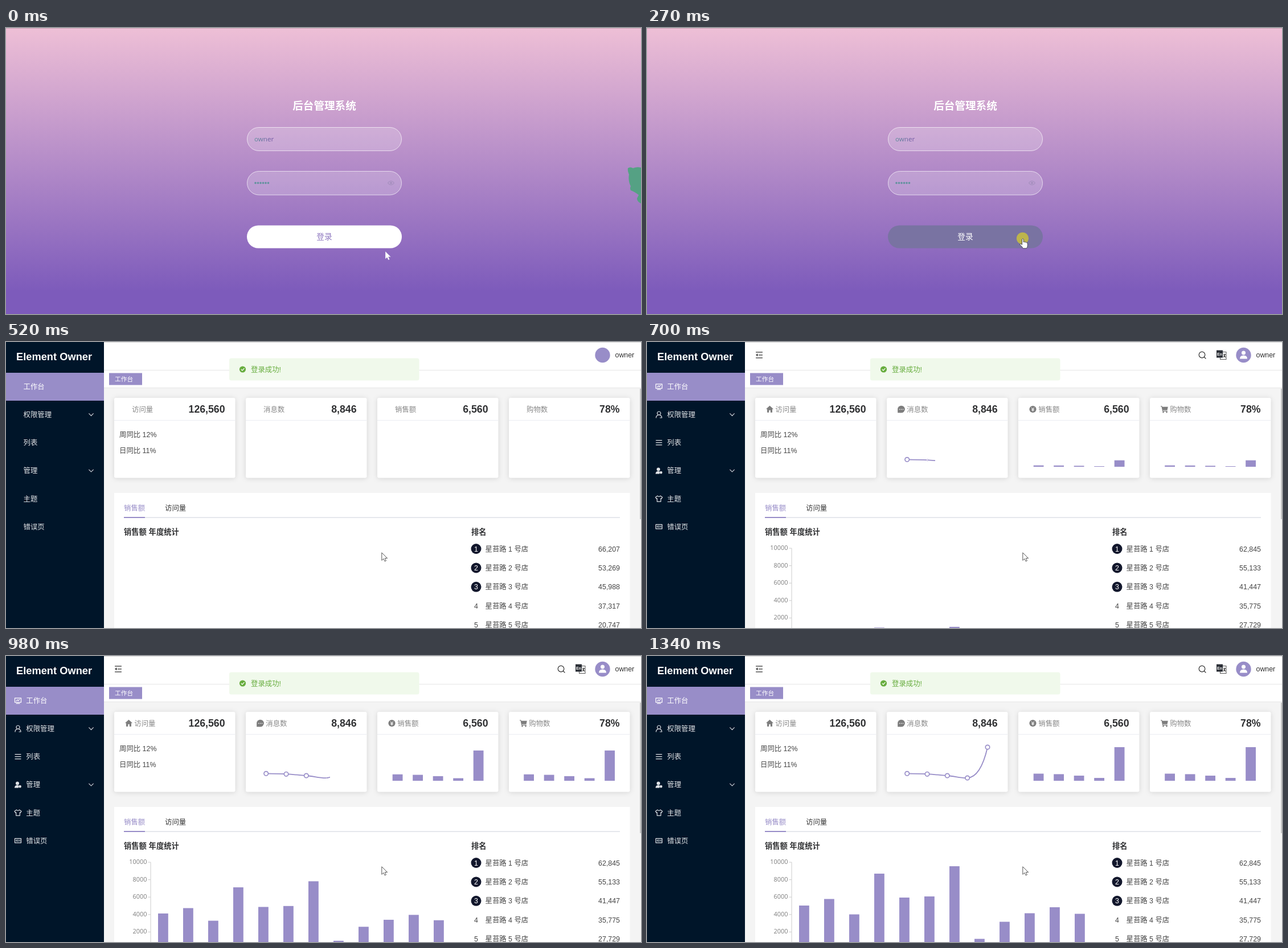
Recreate the animation shown at these times as an HTML page. Size 1115 by 502 pixels, loop 1530 ms.

```html
<!DOCTYPE html>
<html lang="zh-CN">
<head>
<meta charset="utf-8">
<title>Dashboard login</title>
<style>
  html, body { margin: 0; width: 100%; height: 100%; overflow: hidden; background: #fff; }
  svg { display: block; width: 1115px; height: 502px; }
  text { font: 12.4px "Liberation Sans", "Noto Sans CJK SC", "Noto Sans CJK", sans-serif; white-space: pre; }
  .bold { font-weight: 700; }
  .line { fill: none; stroke: currentColor; stroke-width: 1.2; stroke-linecap: round; stroke-linejoin: round; }
  .card { fill: #fff; filter: drop-shadow(0 1px 4px rgba(0, 0, 0, .13)); }
  .field { fill: rgba(255, 255, 255, .2); stroke: rgba(255, 255, 255, .65); }
  .axis { font: 10.9px "Open Sans", "Noto Sans", sans-serif; fill: #7d7d7d; text-anchor: end; }
  .theme { fill: #988dc8; }
</style>
</head>
<body>
<svg viewBox="0 0 1115 502">
  <defs>
    <linearGradient id="sky" x1="0" y1="0" x2="0" y2="1">
      <stop offset="0" stop-color="#eebfd6"/>
      <stop offset=".92" stop-color="#7d5bbb"/>
    </linearGradient>
    <linearGradient id="ink">
      <stop offset="0" stop-color="#5b8f98"/>
      <stop offset="1" stop-color="#7352a4"/>
    </linearGradient>
    <clipPath id="reveal"><rect id="revealBox" x="439" y="140" width="0" height="95"/></clipPath>
    <path id="chevron" class="line" d="M-3.8 -1.8 0 2 3.8 -1.8"/>
  </defs>

  <g id="login">
    <rect width="1115" height="502" fill="url(#sky)"/>
    <rect width="1115" height="1" fill="#c9a3b6"/>
    <text class="bold" x="559" y="143" text-anchor="middle" fill="#fff" style="font-size:18.6px">后台管理系统</text>
    <rect class="field" x="423.5" y="174.5" width="271" height="41" rx="20.5"/>
    <text x="436" y="199" fill="url(#ink)" style="font:11.6px 'Open Sans','Noto Sans',sans-serif">owner</text>
    <rect class="field" x="423.5" y="251.5" width="271" height="41.5" rx="20.7"/>
    <g id="dots" fill="#5f929c"></g>
    <g color="#a68fbf">
      <path class="line" d="M670.5 272q5.5 -7 11 0q-5.5 7 -11 0z"/>
      <circle cx="676" cy="272" r="2" fill="currentColor"/>
    </g>
    <rect id="button" x="423" y="346.5" width="272" height="40" rx="20"/>
    <text id="buttonText" x="559" y="371" text-anchor="middle" style="font-size:13.7px">登录</text>
    <path id="mascot" fill="#55a184" d="M1092 246Q1096 243 1101 246Q1108 243 1115 245V308Q1108 305 1108 299L1111 293Q1103 287 1097 285Q1095 281 1097 278Q1092 268 1094 257Q1091 251 1092 246Z"/>
  </g>

  <g id="board">
    <rect width="1115" height="502" fill="#f4f4f4"/>
    <rect x="172" width="943" height="81" fill="#fff"/>
    <path d="M172 49.5H1115M172 80.5H1115" stroke="#e6e6e6"/>
    <rect x="172" width="943" height="1" fill="#d9d9d9"/>
    <rect width="172" height="502" fill="#001529"/>
    <text class="bold" x="18" y="31.5" fill="#fff" style="font-size:18.3px">Element Owner</text>
    <rect class="theme" y="54" width="172" height="49"/>
    <g id="menu"></g>
    <rect class="theme" x="181" y="54.5" width="58" height="21"/>
    <text x="191" y="69" fill="#fff" style="font-size:10.7px">工作台</text>
    <circle class="theme" cx="1047.5" cy="23" r="13.2"/>
    <text x="1069.5" y="27" fill="#333">owner</text>
    <rect x="1113" y="82" width="2" height="229" fill="#c8c8c8"/>
    <g id="cards"></g>
    <text x="199" y="167" fill="#444">周同比 12%</text>
    <text x="199" y="195" fill="#444">日同比 11%</text>

    <rect x="190" y="265" width="905.5" height="237" fill="#fff"/>
    <text class="theme" x="207" y="296">销售额</text>
    <text x="279" y="296" fill="#333">访问量</text>
    <rect x="207" y="307.3" width="871" height="1.7" fill="#e2e4ea"/>
    <rect class="theme" x="207" y="307" width="37" height="2"/>
    <text class="bold" x="207" y="337.5" fill="#303133" style="font-size:13.3px">销售额 年度统计</text>
    <text class="bold" x="817" y="337.5" fill="#303133" style="font-size:13.3px">排名</text>
    <g id="ranks"></g>

    <g id="icons">
      <g color="#333">
        <path class="line" d="M191.5 17.8H202.5M196.5 22.8H202.5M191.5 27.8H202.5"/>
        <path d="M194.5 20.3V25.3L191 22.8Z" fill="currentColor"/>
        <circle class="line" cx="974.5" cy="22.5" r="5.3"/>
        <path class="line" d="M978.5 26.5 981 29"/>
        <rect x="1006.5" y="17.5" width="10.5" height="13" fill="#fff" stroke="#555"/>
        <rect x="1000" y="14.5" width="11" height="13" fill="#2b2f36"/>
        <text x="1001" y="23.5" fill="#fff" class="bold" style="font-size:7px">En</text>
        <path class="line" d="M1012.5 21.5H1015.5L1012.5 26.5M1013 23.5 1015.5 26.5"/>
      </g>
      <g fill="#fff">
        <circle cx="1047.5" cy="19" r="3.5"/>
        <path d="M1041 29.5Q1041 23.5 1047.5 23.5T1054 29.5Z"/>
      </g>
      <g id="menuIcons"></g>
      <g id="cardIcons"></g>
    </g>

    <g id="charts">
      <g id="axis"></g>
      <g id="bars" class="theme"></g>
      <path clip-path="url(#reveal)" fill="none" stroke="#988dc8" stroke-width="1.8"
        d="M456.7 206.3C469 206.4 480 206.5 492 207.2S515 209 527.3 210S553 214.5 562.6 214C582 213 592 186 598 160"/>
      <g id="marks" fill="#fff" stroke="#988dc8" stroke-width="1.7"></g>
    </g>
  </g>

  <g id="message">
    <rect x="392" width="333.5" height="39" rx="3.5" fill="#f0f9eb"/>
    <circle cx="415.5" cy="19.5" r="5.6" fill="currentColor"/>
    <path class="line" d="M413 19.6 414.9 21.5 418.2 17.9" style="stroke:#fff"/>
    <text x="430" y="24.3" fill="currentColor">登录成功!</text>
  </g>

  <circle id="click" cx="659.5" cy="369.3" r="10.6" fill="#bdb44c"/>
  <path id="arrow" fill="#fff" d="M0 0V13.5L3.2 10.7 5.3 15.2 7.6 14.2 5.5 9.8H9.8Z"/>
  <path id="hand" fill="#fff" stroke="#3c3c48" stroke-width=".9" stroke-linejoin="round"
    d="M-1.3 1Q0 -1 1.3 1V6Q3 4.5 4 6.3Q5.7 5 6.5 7Q8.5 6.5 8.5 9V12Q8.5 15 6.5 17H.5Q-1 14 -5 10.5Q-5 8.5 -3.2 9L-1.3 10.5Z"/>
</svg>

<script>
const $ = id => document.getElementById(id);
const fill = (id, list, make) => { $(id).innerHTML = list.map(make).join(''); };
const at = (x, y, body) => `<g transform="translate(${x} ${y})">${body}</g>`;
const line = d => `<path class="line" d="${d}"/>`;
const solid = d => `<path fill="currentColor" d="${d}"/>`;
const dot = (x, y, r) => `<circle cx="${x}" cy="${y}" r="${r}" fill="currentColor"/>`;

const LOOP = 1530;
const TICKS = [0, 70, 140, 200, 270, 330, 390, 450, 520, 590, 650, 700, 770,
  840, 910, 980, 1060, 1130, 1200, 1270, 1340];

const menu = ['工作台', '权限管理', '列表', '管理', '主题', '错误页'];
const menuY = i => 78.3 + i * 49.2;
const menuIcons = [
  line('M-5.5 -4.5H5.5V3H-5.5ZM-3 5H3M-3 .5 -1 -1.5 .5 0 3 -2.5'),
  line('M-3 -2.5A3 3 0 1 1 3 -2.5A3 3 0 1 1 -3 -2.5M-5 5.5Q-5 1.5 -1.5 .8M1.5 .8Q5 1.5 5 5.5H2'),
  line('M-5 -4H5M-5 0H5M-5 4H5'),
  dot(-1, -2.5, 3) + solid('M-6 5.5Q-6 .8 -1 .8L1 1.2V5.5Z') + dot(3.5, 3.2, 2.4),
  line('M-2.5 -5Q0 -2.5 2.5 -5L6 -2.5 4.3 0 3.3 -.6V5H-3.3V-.6L-4.3 0 -6 -2.5Z'),
  line('M-5.5 3.5V-4H5.5V3.5H-5.5') +
    '<text class="bold" y="2" text-anchor="middle" fill="currentColor" style="font-size:5px">404</text>'
];

const cardX = i => 190 + i * 231;
const cards = [['访问量', '126,560'], ['消息数', '8,846'], ['销售额', '6,560'], ['购物数', '78%']];
const cardIcons = [
  solid('M0 -6.5 6.5 -.5H4.5V5.5H1.3V1.5H-1.3V5.5H-4.5V-.5H-6.5Z'),
  dot(0, -.3, 6.3) + solid('M-6.3 0V6H0Z') +
    '<path d="M-3 0h.1M0 0h.1M3 0h.1" stroke="#fff" stroke-width="1.6" stroke-linecap="round"/>',
  dot(0, -.3, 6.1) + '<path d="M-2.5 -3.5 0 -.7 2.5 -3.5M0 -.7V3.5M-2.3 -.3H2.3M-2.3 1.6H2.3" fill="none" stroke="#fff"/>',
  line('M-6 -5.5H-4.5L-2.8 3H5') + solid('M-4.3 -4.5H6.3L5 1.5H-3Z') + dot(-2, 5, 1.2) + dot(4, 5, 1.2)
];

const ranksBefore = ['66,207', '53,269', '45,988', '37,317', '20,747'];
const ranksAfter = ['62,845', '55,133', '41,447', '35,775', '27,729'];

const smallBars = [12.5, 11.6, 9, 5, 59];
const bigBars = [77, 88.5, 61.5, 133, 91, 93, 146, 18.5, 48.5, 63.5, 74, 62.5];
const barSet = (x, gap, base, heights, start, span) =>
  heights.map((h, i) => ({ x: x + i * gap, base, h, start, span }));
const bars = [
  ...barSet(678.7, 35.5, 219, smallBars, 659, 598),
  ...barSet(909.2, 35.5, 219, smallBars, 659, 598),
  ...barSet(267, 44, 515, bigBars, 675, 702)
];
const points = [[456.7, 206.3], [492, 207.2], [527.3, 210], [562.6, 214], [598, 160]];

fill('dots', [...Array(6).keys()], i => `<circle cx="${438 + i * 4.5}" cy="272" r="1.8"/>`);
fill('menu', menu, (s, i) => `<text class="label" y="${menuY(i) + 4.5}" fill="${i ? '#e3e5e8' : '#fff'}">${s}</text>` +
  (s.endsWith('管理') ? `<use href="#chevron" x="149.5" y="${menuY(i)}" color="#c8ccd2"/>` : ''));
fill('menuIcons', menuIcons, (s, i) => `<g color="${i ? '#dfe2e6' : '#fff'}">${at(21, menuY(i), s)}</g>`);
fill('cards', cards, ([name, value], i) => at(cardX(i), 98,
  `<rect class="card" width="212.5" height="140.5" rx="3"/><path d="M0 39.5H212.5" stroke="#ebedf2"/>
   <text class="title" y="25" fill="#888">${name}</text>
   <text class="bold" x="194.5" y="26" text-anchor="end" fill="#303133" style="font-size:17.7px">${value}</text>`));
fill('cardIcons', cardIcons, (s, i) => `<g color="#7d7d7d">${at(cardX(i) + 25.5, 118.3, s)}</g>`);
fill('ranks', ranksBefore, (v, i) => at(0, 363 + i * 33.4,
  (i < 3 ? '<circle cx="825.5" r="9" fill="#12172c"/>' : '') +
  `<text x="825.5" y="4.5" text-anchor="middle" fill="${i < 3 ? '#fff' : '#444'}">${i + 1}</text>
   <text x="841.5" y="4.5" fill="#444">星苔路 ${i + 1} 号店</text>
   <text class="score" x="1078" y="4.5" text-anchor="end" fill="#444"></text>`));
fill('axis', [10000, 8000, 6000, 4000, 2000], (v, i) => {
  const y = 362 + i * 30.6;
  return `<text class="axis" x="247.5" y="${y + 3}">${v}</text><path d="M249.5 ${y}H254" stroke="#ccc"/>`;
});
$('axis').innerHTML += '<path d="M254 362V502" stroke="#ccc"/>';
fill('bars', bars, b => `<rect x="${b.x}" width="17.8"/>`);
fill('marks', points, ([x, y]) => `<circle r="3.7"/>`);

const barEls = [...$('bars').children];
const markEls = [...$('marks').children];
const labels = document.querySelectorAll('.label');
const titles = document.querySelectorAll('.title');
const scores = document.querySelectorAll('.score');

const clamp = v => Math.max(0, Math.min(1, v));
const cubicOut = p => 1 - (1 - clamp(p)) ** 3;
const set = (el, name, value) => el.setAttribute(name, value);
const show = (id, on) => { $(id).style.display = on ? '' : 'none'; };

function drawLogin(t) {
  const face = t < 70 ? '#fff' : t < 140 ? '#cfc9e5' : t === 270 ? '#7973a2' : '#b5add6';
  set($('button'), 'fill', face);
  set($('buttonText'), 'fill', t < 70 ? '#8f79c0' : '#fff');
  show('mascot', t < 70);
}

function drawBoard(t) {
  const ready = t >= 590;
  show('icons', ready);
  show('charts', t >= 650);
  labels.forEach(el => set(el, 'x', ready ? 35.3 : 30.5));
  titles.forEach(el => set(el, 'x', ready ? 35.3 : 31));
  scores.forEach((el, i) => { el.textContent = (t >= 650 ? ranksAfter : ranksBefore)[i]; });

  bars.forEach(({ base, h, start, span }, i) => {
    const now = h * cubicOut((t - start) / span);
    set(barEls[i], 'y', base - now);
    set(barEls[i], 'height', now);
  });
  const sweep = .38 + (t - 700) * .001275;
  set($('revealBox'), 'width', 176.5 * clamp(sweep));
  points.forEach(([x, y], i) => {
    const s = clamp((sweep - .1 - i * .2) / .2);
    set(markEls[i], 'transform', `translate(${x} ${y}) scale(${s})`);
  });
}

function drawMessage(t) {
  show('message', t >= 390);
  const y = t < 450 ? 15 : t < 520 ? 27 : 28.5;
  set($('message'), 'transform', `translate(0 ${y})`);
  set($('message'), 'opacity', t < 450 ? .6 : 1);
  set($('message'), 'color', t < 520 ? '#67c23a' : '#67ad3e');
}

function drawCursor(t) {
  const hand = t >= 70 && t < 520;
  const [x, y] = t < 70 ? [666, 392] : t < 140 ? [661.5, 378] : [659.8, 369.8];
  show('click', t === 270);
  show('hand', hand);
  show('arrow', !hand);
  set($(hand ? 'hand' : 'arrow'), 'transform', `translate(${x} ${y})`);
  set($('arrow'), 'stroke', t < 70 ? '#8a78b5' : '#444');
  set($('arrow'), 'stroke-width', t < 70 ? .4 : .9);
}

const begin = performance.now();
let last = -1;
function frame() {
  const now = (performance.now() - begin) % LOOP;
  const t = TICKS.findLast(v => v <= now) ?? 0;
  if (t !== last) {
    last = t;
    show('login', t < 520);
    show('board', t >= 520);
    drawLogin(t);
    drawBoard(t);
    drawMessage(t);
    drawCursor(t);
  }
  requestAnimationFrame(frame);
}
frame();
</script>
</body>
</html>
```
